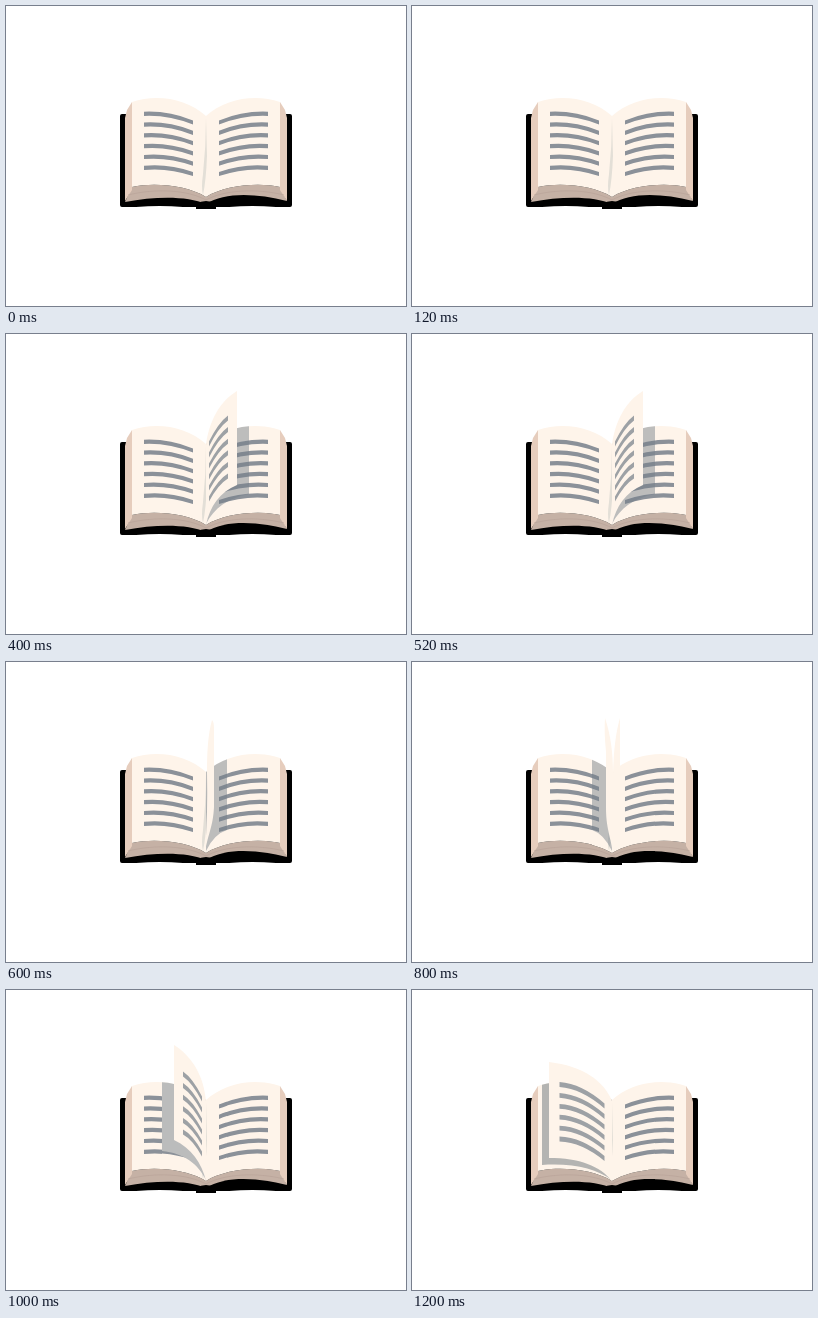
Animation, 400 px wide and 300 px high, one loop 1.4 s. Source, as an HTML page:

```html
<!DOCTYPE html>
<html lang="en">
<head>
<meta charset="utf-8">
<title>Turning page</title>
<style>
html, body { margin: 0; width: 100%; height: 100%; overflow: hidden; background: #fff; }
svg { display: block; width: 100vw; height: 100vh; }
.paper { fill: #fef4ea; }
.ink { fill: #8b9199; }
.soft { fill: #9da1a5; }
.edge { fill: #c5b1a5; }
</style>
</head>
<body>
<svg id="stage" viewBox="0 0 400 300">
  <defs>
    <path id="sheet" d="M126 96C150 88 180 92 200 110V191C182 180 150 176 126 181Z"/>
    <clipPath id="open">
      <use href="#sheet"/>
      <use href="#sheet" transform="matrix(-1 0 0 1 400 0)"/>
    </clipPath>
    <g id="half">
      <path d="M126 96L121 104L119 112V195L126 184Z" fill="#e6cdbd"/>
      <path d="M122 189C150 182 182 184 200 194" fill="none" stroke="#b7a297" stroke-width=".6"/>
      <use href="#sheet" class="paper"/>
      <g class="ink lines"></g>
    </g>
  </defs>
  <path d="M116 108H130V150H270V108H284Q286 108 286 110V199Q286 201 284 201H270Q246 199 223 201H210V203H190V201H177Q154 199 130 201H116Q114 201 114 199V110Q114 108 116 108Z"/>
  <path class="edge" d="M119 196L126 181C150 176 182 180 200 191V198C182 190 150 190 119 196Z"/>
  <path class="edge" d="M281 195L274 181C250 176 218 180 200 191V198C218 186 250 187 281 195Z"/>
  <path d="M190 203V198Q200 192 210 198V203Z"/>
  <use href="#half"/>
  <use href="#half" transform="matrix(-1 0 0 1 400 0)"/>
  <path d="M200 112L201 150Q200 175 197 189Q195 182 197 168Q200 140 200 112Z" fill="#e3dfd7"/>
  <g id="poses"></g>
</svg>
<script>
const STEP = 200;
const NS = "http://www.w3.org/2000/svg";

function add(parent, tag, attrs) {
  const el = document.createElementNS(NS, tag);
  for (const key in attrs) el.setAttribute(key, attrs[key]);
  return parent.appendChild(el);
}

// Six curved bars between an outer point (x0, y0) and an inner point (x1, y1).
function bars(parent, x0, y0, x1, y1, gap0, gap1, bend, thick) {
  const mid = (x0 + x1) / 2;
  for (let i = 0; i < 6; i++) {
    const a = y0 + i * gap0, b = y1 + i * gap1, h = thick / 2;
    const c = (a + b) / 2 - bend;
    add(parent, "path", {
      d: `M${x0} ${a - h}Q${mid} ${c - h} ${x1} ${b - h}V${b + h}Q${mid} ${c + h} ${x0} ${a + h}Z`
    });
  }
}

bars(document.querySelector(".lines"), 138, 107.8, 187, 116.5, 10.8, 10.3, 5.5, 4.2);

// leaf: turning page, cast: its shadow, text: bar geometry
const poses = [
  null,
  { leaf: "M200 111C208 92 229 76 263.5 72.500V168C232 168 212 176 200 191Z",
    cast: "M200 80H268V174C238 173 216 178 200 190Z", tone: "#b4b4b2", alpha: 1,
    text: [252, 94.5, 207, 116, 10.9, 10.5, 9, 4.8] },
  { leaf: "M200 111C203 88 213 68 231 57V151C214 158 204 172 200 191Z",
    cast: "M200 80H243V160C222 164 208 174 200 190Z", tone: "#737d88", alpha: .47,
    text: [222, 84, 203, 110, 11.6, 11, 6, 5] },
  { leaf: "M201 111C201 90 202 72 206 58Q208 60 208 66V145C207 165 202 172 199 190Q202 150 201 111Z",
    cast: "M200 80H221V168Q208 172 200 189Z", tone: "#737d88", alpha: .47 },
  { leaf: "M193 56C199 74 201 92 201 111V191C198 172 194 166 194 145V90Q192 70 193 56ZM208 56V104L201 111Q202 76 208 56Z",
    cast: "M200 80H180V168Q192 172 200 189Z", tone: "#737d88", alpha: .47 },
  { leaf: "M168 55C187 67 198 87 200 111V191C196 173 185 158 168 150Z",
    cast: "M200 80H156V161C178 163 192 174 200 190Z", tone: "#bbbcbc", alpha: 1,
    text: [177, 84, 196, 109, 11.6, 11, 6, 5] },
  { leaf: "M137 72C171 76 192 91 200 111V191C188 176 168 168 137 168Z",
    cast: "M200 80H130V175C162 173 184 179 200 190Z", tone: "#b4b4b2", alpha: 1,
    text: [147.5, 94.5, 192.5, 116, 10.9, 10.5, 9, 4.8] }
];

const layers = poses.map(p => {
  const g = add(document.getElementById("poses"), "g", { visibility: "hidden" });
  if (!p) return g;
  add(g, "path", { d: p.cast, fill: p.tone, opacity: p.alpha, "clip-path": "url(#open)" });
  add(g, "path", { d: p.leaf, class: "paper" });
  if (p.text) bars(add(g, "g", { class: "soft" }), ...p.text);
  return g;
});

const start = performance.now();
function draw(now) {
  const shown = Math.floor(Math.max(0, now - start) / STEP) % layers.length;
  layers.forEach((g, i) => g.setAttribute("visibility", i === shown ? "visible" : "hidden"));
  requestAnimationFrame(draw);
}
draw(start);
</script>
</body>
</html>
```
